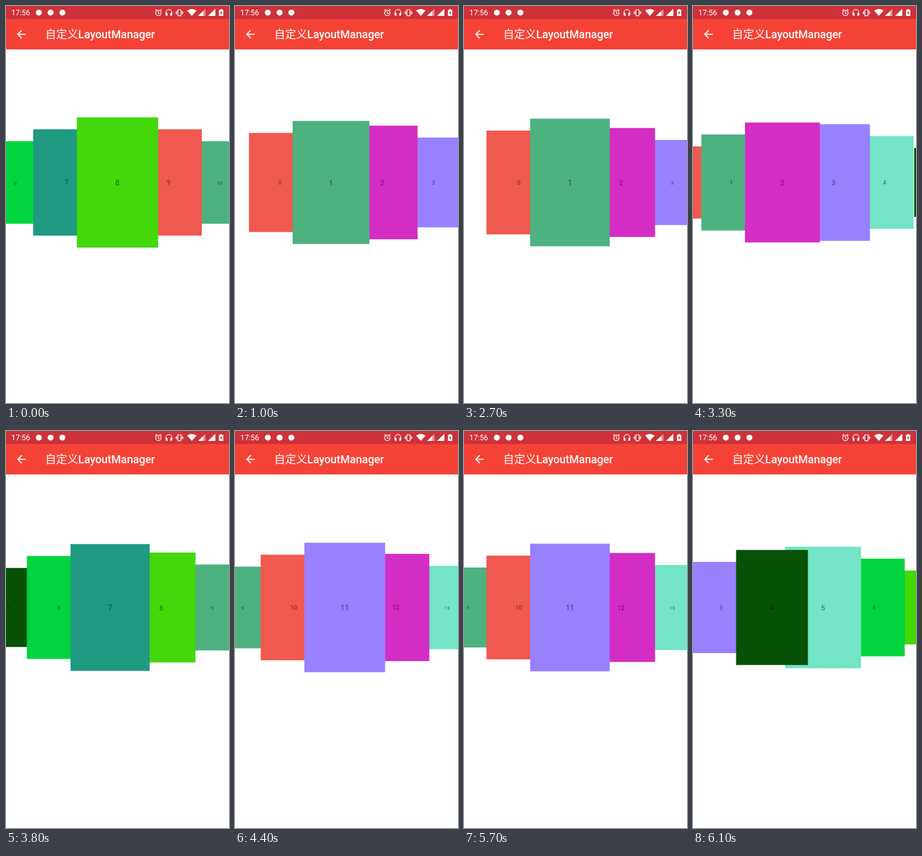
Write an HTML page with a canvas that moves like this. It is 360x640 px and loops after 6.2 s.

```html
<!DOCTYPE html>
<html lang="zh">
<head>
<meta charset="utf-8">
<style>
  html, body { margin: 0; width: 100%; height: 100%; overflow: hidden; background: #fff; }
  canvas { display: block; width: 360px; height: 640px; }
</style>
</head>
<body>
<canvas id="stage"></canvas>
<script>
const W = 360, H = 640, LOOP = 6200, STEP = 100;
const canvas = document.getElementById('stage');
const ctx = canvas.getContext('2d');
const ratio = window.devicePixelRatio || 1;
canvas.width = W * ratio;
canvas.height = H * ratio;

const FONT = 'Roboto, "Noto Sans CJK SC", "Noto Sans CJK", sans-serif';
const RED = '#f44336';
const CARD = { w: 131.25, h: 210, gap: 82.5, shrink: 0.1833, x: 180, y: 284.5 };
const COUNT = 18;

const COLORS = {
  P: '#f0594f', G: '#4db180', U: '#d42dc4', V: '#9980ff', D: '#075207',
  C: '#74e4c6', E: '#00d43e', T: '#1f9a80', L: '#42d80a'
};
// Recycled views keep their colour, so the order depends on the scroll history.
const ORDERS = [
  { until: 2000, keys: 'PGUVCDETLPGUVCDETL' },
  { until: 5300, keys: 'PGUVCDETLGPVUCDETL' },
  { until: LOOP, keys: 'PGUVDCELTGPVUCDETL' }
];

// Scroll position in cards: [time, position]
const SCROLL = [
  [0, 8], [500, 8], [700, 6.2], [1000, 1.303], [1150, 0], [2000, 0],
  [2700, 1.109], [3000, 2], [3200, 2], [3500, 4.4], [3800, 7.145],
  [4400, 11.034], [5000, 17], [5200, 17], [5300, 16.41], [5600, 12.6],
  [6100, 4.636], [6200, 3.2]
];

const secant = i => (SCROLL[i + 1][1] - SCROLL[i][1]) / (SCROLL[i + 1][0] - SCROLL[i][0]);

function slope(i) {
  if (i === 0) return secant(0);
  if (i === SCROLL.length - 1) return secant(i - 1);
  const a = secant(i - 1), b = secant(i);
  return a * b <= 0 ? 0 : 2 * a * b / (a + b);
}

// Monotone cubic interpolation
function scrollAt(t) {
  let i = 0;
  while (i < SCROLL.length - 2 && t >= SCROLL[i + 1][0]) i++;
  const [t0, p0] = SCROLL[i], [t1, p1] = SCROLL[i + 1];
  const d = t1 - t0, u = (t - t0) / d, v = 1 - u;
  return p0 * (1 + 2 * u) * v * v + p1 * u * u * (3 - 2 * u)
    + d * u * v * (slope(i) * v - slope(i + 1) * u);
}

function text(str, x, y, size, color, weight = 400, align = 'left') {
  ctx.font = `${weight} ${size}px ${FONT}`;
  ctx.fillStyle = color;
  ctx.textAlign = align;
  ctx.fillText(str, x, y);
}

function drawCard(i, pos, keys) {
  const d = i - pos;
  const s = 1 - CARD.shrink * Math.abs(d);
  if (i < 0 || i >= COUNT || s <= 0) return;
  const x = CARD.x + d * CARD.gap, w = CARD.w * s, h = CARD.h * s;
  ctx.fillStyle = COLORS[keys[i]];
  ctx.fillRect(x - w / 2, CARD.y - h / 2, w, h);
  text(i, x, CARD.y + 4.8 * s, 12.25 * s, 'rgba(0,0,0,.54)', 400, 'center');
}

function drawCards(t) {
  const pos = scrollAt(t), top = Math.floor(pos + 1e-6);
  const { keys } = ORDERS.find(o => t < o.until);
  for (let k = 4; k > 0; k--) {
    drawCard(top - k, pos, keys);
    drawCard(top + k, pos, keys);
  }
  drawCard(top, pos, keys);
}

function drawGlow(t, start, peak, end, edge, dir) {
  if (t <= start || t >= end) return;
  const power = t < peak ? (t - start) / (peak - start) : (end - t) / (end - peak);
  ctx.globalAlpha = 0.15 * power;
  ctx.fillStyle = RED;
  ctx.beginPath();
  ctx.moveTo(edge, 155);
  ctx.quadraticCurveTo(edge + dir * 70 * power, 497, edge, 839);
  ctx.fill();
  ctx.globalAlpha = 1;
}

function fill(path, color = '#fff') {
  ctx.fillStyle = color;
  ctx.fill(new Path2D(path));
}

function line(path, width = 1.2) {
  ctx.strokeStyle = '#fff';
  ctx.lineWidth = width;
  ctx.stroke(new Path2D(path));
}

function dot(x, y, r) {
  ctx.fillStyle = '#fff';
  ctx.beginPath();
  ctx.arc(x, y, r, 0, Math.PI * 2);
  ctx.fill();
}

function drawStatusBar() {
  ctx.fillStyle = '#cd323a';
  ctx.fillRect(0, 0, W, 21);
  text('17:56', 8.5, 15.2, 12.25, '#fff');
  [53, 72, 91].forEach(x => dot(x, 10.7, 4.8));

  // alarm
  line('M250.3 11.2a4.3 4.3 0 1 1-8.6 0a4.3 4.3 0 1 1 8.6 0M246 8.5v3l2 1.3M240.8 7.4l2.6-2.2M251.2 7.4l-2.6-2.2');
  // headphones
  line('M258.3 13v-2.6a4.7 4.7 0 0 1 9.4 0V13');
  fill('M257.7 11.2h3v4.6h-1.6q-1.4 0-1.4-1.4zM268.3 11.2h-3v4.6h1.6q1.4 0 1.4-1.4z');
  // vibrate
  line('M277.6 6h4.8v9.6h-4.8zM275.8 7.6v6.4M284.2 7.6v6.4M274.4 9.3v3M285.6 9.3v3', 1.1);
  // wifi and signals
  fill('M300 16L292.4 7.2Q300 2.2 307.6 7.2z');
  fill('M310 16L322 4.5V16z', 'rgba(255,255,255,.45)');
  fill('M310 16L318.5 7.9V16z');
  fill('M326 16L338 4.5V16z');
  // battery
  fill('M345.8 5h3v1.2h2V16h-7V6.2h2z');
  fill('M347.8 7.8l-2.4 4h1.5v2.8l2.4-4h-1.5z', '#cd323a');
}

function drawToolbar() {
  ctx.fillStyle = RED;
  ctx.fillRect(0, 21, W, 49);
  ctx.save();
  ctx.translate(14.3, 35);
  ctx.scale(0.875, 0.875);
  fill('M20 11H7.83l5.59-5.59L12 4l-8 8 8 8 1.41-1.41L7.83 13H20z');
  ctx.restore();
  text('自定义LayoutManager', 63.3, 52, 17.75, '#fff', 500);
}

function draw(now) {
  const t = Math.floor((now % LOOP) / STEP) * STEP;
  ctx.setTransform(ratio, 0, 0, ratio, 0, 0);
  ctx.fillStyle = '#fff';
  ctx.fillRect(0, 0, W, H);
  drawCards(t);
  drawGlow(t, 1000, 1200, 1600, 0, 1);
  drawGlow(t, 4900, 5100, 5300, W, -1);
  drawStatusBar();
  drawToolbar();
}

let start;
function tick(now) {
  if (start === undefined) start = now;
  draw(now - start);
  requestAnimationFrame(tick);
}
requestAnimationFrame(tick);
</script>
</body>
</html>
```
